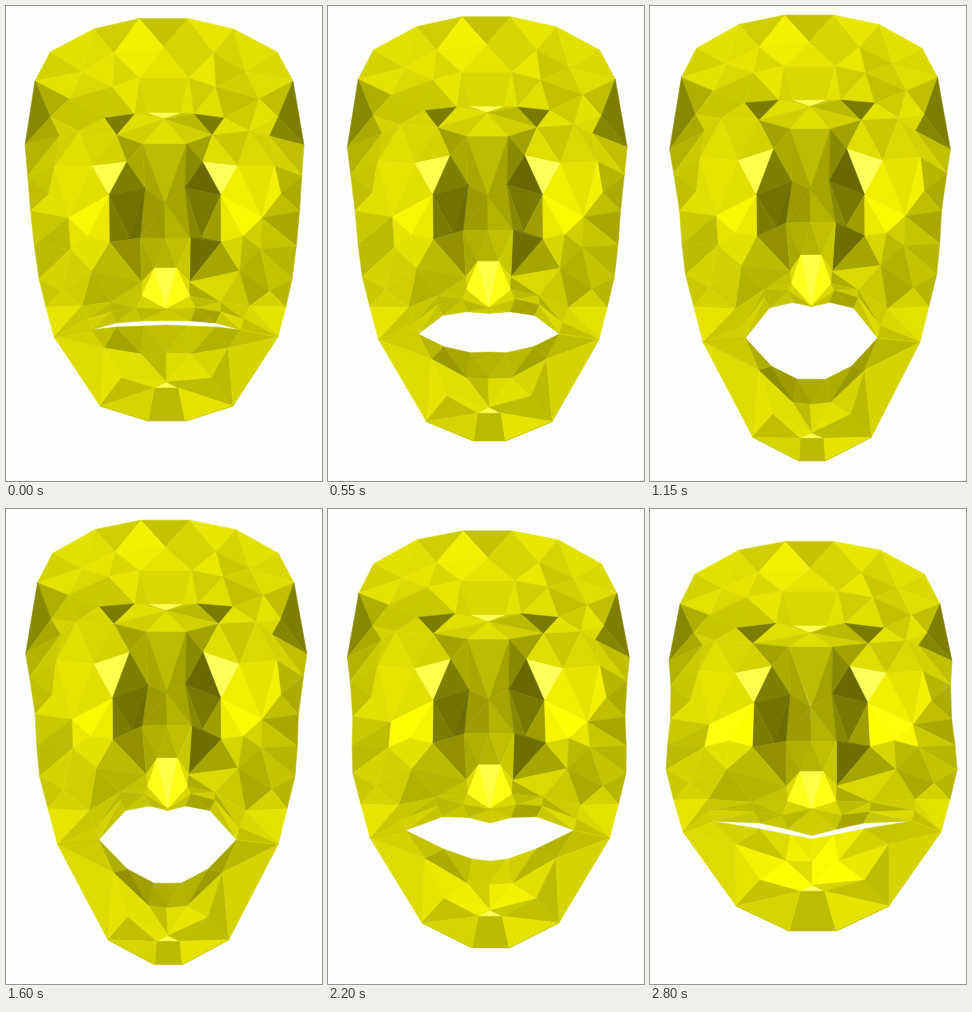
Write an HTML page that moves like this. It is 316 by 475 pixels and loops after 2.95 s.

```html
<!DOCTYPE html>
<html lang="en">
<head>
<meta charset="utf-8">
<title>Mask</title>
<style>
html, body { margin: 0; width: 100%; height: 100%; overflow: hidden; background: #fefefd; }
svg { display: block; width: 100%; height: 100%; }
</style>
</head>
<body>
<svg id="stage" viewBox="0 0 316 475" stroke-width=".5" stroke-linejoin="round"></svg>
<script>
// Rows of key points run from the axis to the rim: [distance from the axis, y].
// Neighbouring rows are zipped into triangles, then mirrored.
const corner = [75, 324], hinge = [112, 331], jawbone = [66.5, 400];
const skullRows = [
  [[24.5, 12.5], [70, 23], [113.5, 46]],
  [[0, 41], [50, 47], [82, 66], [129, 75]],
  [[25, 72], [52, 81], [95, 93], [114, 111], [139.5, 139]],
  [[17, 107], [30, 108], [60, 112], [85, 125], [105, 130], [137, 170]],
  [[0, 113], [48, 129], [73, 160], [110, 160], [116, 188], [134.5, 205]],
  [[22, 138], [38, 156], [56, 189], [97, 212], [131, 240]],
  [[0, 197], [20, 182], [36, 232], [56, 236], [78, 230], [95, 243], [126.5, 273]],
  [[0, 232], [25, 232], [24, 276], [74, 265], [104, 285], [120, 301]],
  [[11, 262], [24, 290], [55, 296], [84, 300], hinge],
  [[0, 303], [30, 302], [55, 306], [78, 313], hinge],
  [[0, 314.5], [25, 315], [50, 317], corner, hinge]
];
const jawRows = [
  [[0, 319], [22, 320], [50, 321], corner, hinge],
  [[0, 347], [25, 348], [62, 342], hinge],
  [[0, 376], [45, 372], jawbone],
  [[12, 382], jawbone],
  [[18.5, 415], jawbone]
];

// Handles pull the points near them; each has its shift when open and when smiling.
const handle = (at, open, smile) => ({ at, open, smile });
const shared = [handle(corner, [-10, 9], [25, -12]), handle(hinge, [-4, 6], [17, -8])];
const skullHandles = [
  ...shared,
  handle([24, 12], [0, -4], [0, 20]),
  handle([129, 75], [-1, -4], [1, 20]),
  handle([139, 139], [1, 5], [2, 13]),
  handle([0, 107], [0, -14], [0, 11]),
  handle([60, 112], [6, -17], [14, 7]),
  handle([22, 138], [-2, -17], [0, 0]),
  handle([110, 160], [0, -10], [2, 2]),
  handle([56, 189], [-2, 0], [1, 5]),
  handle([134, 205], [-4, 0], [6, 5]),
  handle([0, 232], [0, -18], [0, 0]),
  handle([126, 273], [-1, -5], [19, -12]),
  handle([0, 303], [0, -3], [0, -3]),
  handle([0, 314.5], [0, -16], [0, 12]),
  handle([25, 315], [-8, -21], [0, 5]),
  handle([50, 317], [-9, -17], [2, -3])
];
const jawHandles = [
  ...shared,
  handle([0, 319], [0, 61], [0, 11]),
  handle([22, 320], [-9, 60], [0, 6]),
  handle([50, 321], [-11, 44], [2, -1]),
  handle([0, 376], [0, 57], [0, 0]),
  handle(jawbone, [-8, 35], [10, -3]),
  handle([18, 415], [-6, 45], [5, 7])
];

// Soft patches of light: centre, radii, strength at rest, extra when open, extra when smiling.
const patch = (at, size, glow, open = 0, smile = 0) => ({ at, size, glow, open, smile });
const patches = [
  patch([20, 50], [70, 35], 16),
  patch([128, 108], [15, 30], -90),
  patch([46, 116], [11, 8], -75),
  patch([0, 109], [12, 6], 130),
  patch([36, 205], [19, 70], -92),
  patch([0, 205], [20, 48], -42),
  patch([0, 282], [16, 14], 110),
  patch([56, 168], [11, 12], 125),
  patch([82, 180], [34, 42], 28),
  patch([85, 222], [24, 12], 6, 0, 45),
  patch([130, 200], [12, 55], -35),
  patch([95, 278], [40, 24], -18),
  patch([30, 308], [52, 9], -28),
  patch([32, 335], [50, 15], -22, -28, 25),
  patch([12, 355], [36, 34], 0, 0, 32),
  patch([0, 380], [9, 5], 115)
];

const stage = document.getElementById("stage");
const faces = [];
const distance = (p, q) => Math.hypot(p[0] - q[0], p[1] - q[1]);
const mean = (list, i) => list.reduce((sum, p) => sum + p[i], 0) / list.length;

let seed = 7;
function random() {
  seed = (seed * 16807) % 2147483647;
  return seed / 2147483647;
}

// Blends the handles by inverse distance into one shift for the point.
function shiftOf(point, handles) {
  const shift = { open: [0, 0], smile: [0, 0] };
  let total = 0;
  for (const h of handles) {
    const weight = 1 / (distance(point, h.at) ** 4 + 0.01);
    total += weight;
    for (const pose of ["open", "smile"])
      for (const i of [0, 1]) shift[pose][i] += weight * h[pose][i];
  }
  for (const pose of ["open", "smile"]) shift[pose] = shift[pose].map(v => v / total);
  return shift;
}

function lightOf(u, y) {
  const light = { rest: 208 + 44 * (random() - 0.5), open: 0, smile: 0 };
  for (const { at, size, glow, open, smile } of patches) {
    const d = ((u - at[0]) / size[0]) ** 2 + ((y - at[1]) / size[1]) ** 2;
    const fade = Math.exp(-d * d);
    light.rest += glow * fade;
    light.open += open * fade;
    light.smile += smile * fade;
  }
  return light;
}

function addFace(corners, handles) {
  const node = document.createElementNS(stage.namespaceURI, "polygon");
  stage.append(node);
  const points = corners.map(([u, y, side]) => ({ u, y, side, ...shiftOf([u, y], handles) }));
  const centre = mean(corners.map(([u, , side]) => [u * side]), 0);
  faces.push({ node, points, light: lightOf(Math.abs(centre), mean(corners, 1)) });
}

function zip(top, bottom, handles) {
  const on = (p, side) => [...p, side];
  const [p, q] = [top[0], bottom[0]];
  addFace([on(p, -1), on(p, 1), on(q, 1), on(q, -1)].filter(
    ([u, , side]) => u > 0 || side > 0), handles);

  let i = 0, j = 0;
  while (i < top.length - 1 || j < bottom.length - 1) {
    const down = i + 1 < top.length ? distance(top[i + 1], bottom[j]) : Infinity;
    const up = j + 1 < bottom.length ? distance(top[i], bottom[j + 1]) : Infinity;
    const next = down < up ? top[i + 1] : bottom[j + 1];
    const triangle = [top[i], bottom[j], next];
    for (const side of [-1, 1]) addFace(triangle.map(c => on(c, side)), handles);
    if (down < up) i++; else j++;
  }
}

for (const [rows, handles] of [[skullRows, skullHandles], [jawRows, jawHandles]])
  for (let r = 1; r < rows.length; r++) zip(rows[r - 1], rows[r], handles);

function place(p, open, smile) {
  const axis = 159 + 1.7 * open + 2 * smile + 0.008 * (p.y - 200);
  const u = p.u + open * p.open[0] + smile * p.smile[0];
  const y = p.y + open * p.open[1] + smile * p.smile[1];
  return (axis + p.side * u).toFixed(2) + "," + y.toFixed(2);
}

// Light above 255 turns yellow towards white.
function tint(light) {
  const yellow = Math.min(255, Math.round(light));
  const white = Math.max(0, Math.round(light - 255));
  return `rgb(${yellow},${yellow},${white})`;
}

const LOOP = 2950, STEP = 150, STEPS = 9;
const stepsSince = (t, from) =>
  Math.max(0, Math.min(STEPS, 1 + Math.floor((t - from) / STEP)));

let shown = "";
function draw(t) {
  const smile = stepsSince(t, 1600) / STEPS;
  const open = smile ? 1 - smile : stepsSince(t, 100) / STEPS;
  const pose = open + " " + smile;
  if (pose === shown) return;
  shown = pose;
  for (const { node, points, light } of faces) {
    const color = tint(light.rest + open * light.open + smile * light.smile);
    node.setAttribute("points", points.map(p => place(p, open, smile)).join(" "));
    node.setAttribute("fill", color);
    node.setAttribute("stroke", color);
  }
}

const start = performance.now();
function tick() {
  draw((performance.now() - start) % LOOP);
  requestAnimationFrame(tick);
}
tick();
</script>
</body>
</html>
```
